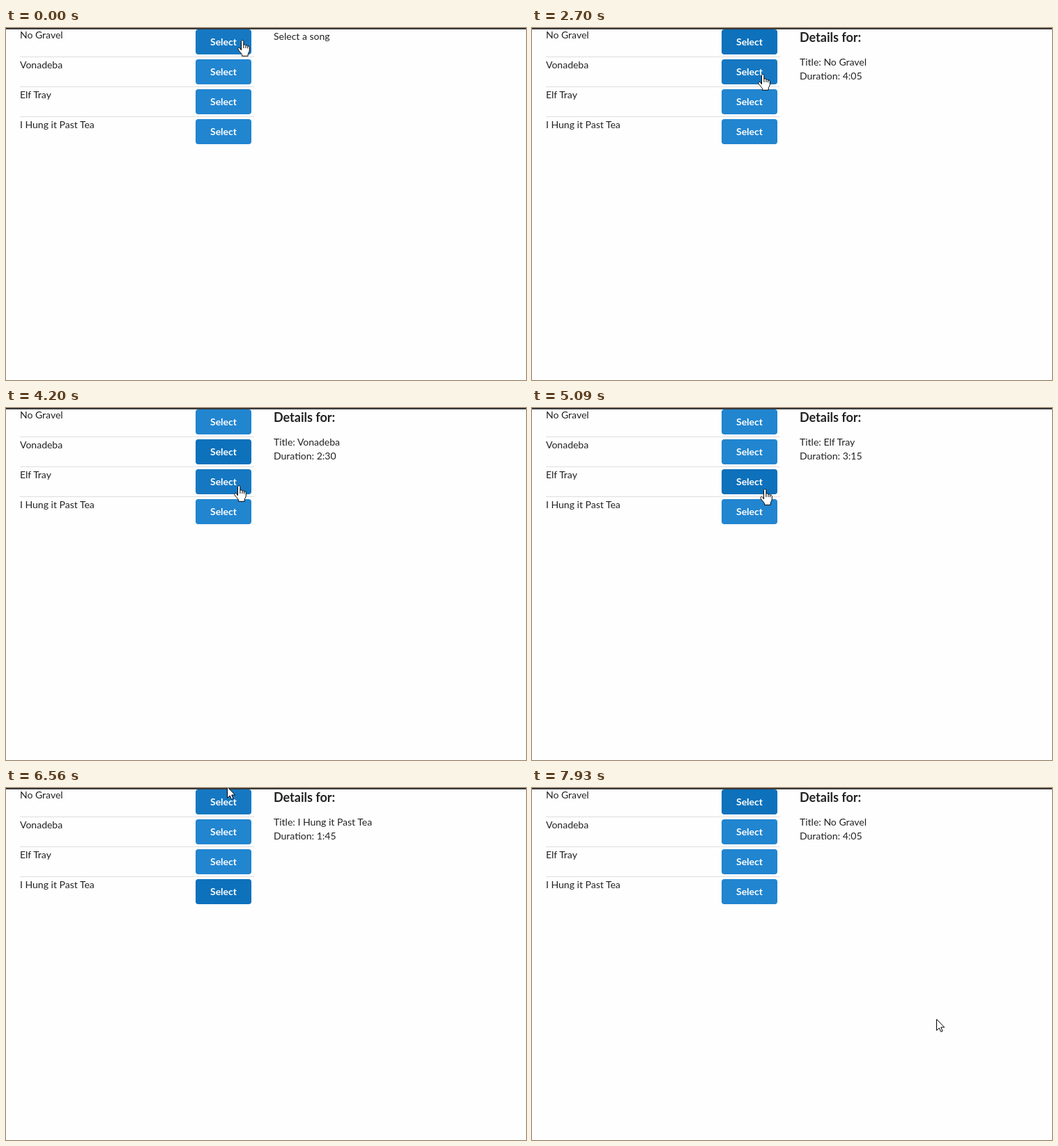
An HTML page that plays this animation: 746x506 px, repeating every 8000 ms.

```html
<!DOCTYPE html>
<html lang="en">
<head>
<meta charset="utf-8">
<title>Song list</title>
<style>
  :root {
    --base: #2185d0;
    --hover: #1678c2;
    --down: #1a69a4;
    --focus: #0d71bb;
    --fade: #1e80cb;
  }
  html, body { margin: 0; width: 100%; height: 100%; overflow: hidden; }
  body {
    position: relative;
    background: #fefefe;
    color: rgba(0, 0, 0, .87);
    font: 14px/19px Lato, sans-serif;
    white-space: nowrap;
  }
  .bar { position: absolute; inset: 0 0 auto; height: 2px; background: #363636; }

  .row { position: absolute; left: 20px; width: 336px; height: 43px; }
  .row:nth-of-type(2) { top: 0; }
  .row:nth-of-type(3) { top: 43px; }
  .row:nth-of-type(4) { top: 86px; }
  .row:nth-of-type(5) { top: 129px; }
  .row:not(.last)::after {
    content: "";
    position: absolute;
    left: 0; top: 41px;
    width: 100%; height: 1px;
    background: #dededf;
  }
  .button {
    position: absolute;
    left: 252px; top: 2px;
    width: 80px; height: 36px;
    border-radius: 4px;
    background: var(--base);
    color: #fff;
    font-weight: 700;
    line-height: 35px;
    text-align: center;
  }

  .panel { position: absolute; left: 384px; top: 0; width: 340px; height: 90px; overflow: hidden; }
  .page { position: relative; height: 90px; }
  .page > * { position: absolute; left: 0; margin: 0; }
  .page h3 { top: 2px; font-size: 18px; line-height: 22px; }
  .hint { top: 2px; }
  .title { top: 39px; }
  .time { top: 59px; }

  .cursor { position: absolute; left: 0; top: 0; width: 18px; height: 24px; }
  .cursor svg { position: absolute; left: 0; top: 0; overflow: visible; }
  .cursor path { fill: #fff; stroke: #000; stroke-linejoin: round; }

  /* 1% of the loop is 80 ms */
  .button, .pages, .cursor, .cursor svg { animation: 8s step-end infinite; }
  .b1 { animation-name: b1; }
  .b2 { animation-name: b2; }
  .b3 { animation-name: b3; }
  .b4 { animation-name: b4; }
  .pages { animation-name: pages; }
  .cursor { animation-name: move; }
  .cursor .hand { animation-name: hand; }
  .cursor .arrow { animation-name: arrow; }

  @keyframes b1 {
    0%, 79% { background: var(--hover); }
    19.625%, 90% { background: var(--down); }
    21.125%, 91.5%, 100% { background: var(--focus); }
    41.5% { background: var(--fade); }
    43.25% { background: var(--base); }
  }
  @keyframes b2 {
    0%, 58.625%, 100% { background: var(--base); }
    27.625% { background: var(--hover); }
    41.5% { background: var(--down); }
    43.25% { background: var(--focus); }
    57.125% { background: var(--fade); }
  }
  @keyframes b3 {
    0%, 72.875%, 100% { background: var(--base); }
    49.5% { background: var(--hover); }
    57.125% { background: var(--down); }
    58.625% { background: var(--focus); }
    71.375% { background: var(--fade); }
  }
  @keyframes b4 {
    0%, 91.5%, 100% { background: var(--base); }
    66.625% { background: var(--hover); }
    71.375% { background: var(--down); }
    72.875% { background: var(--focus); }
    90% { background: var(--fade); }
  }
  @keyframes pages {
    0% { transform: none; }
    21.125%, 91.5%, 100% { transform: translateY(-90px); }
    43.25% { transform: translateY(-180px); }
    58.625% { transform: translateY(-270px); }
    72.875% { transform: translateY(-360px); }
  }
  @keyframes move {
    0% { transform: translate(332px, 17px); }
    3.125% { transform: translate(318px, 17px); }
    4.625% { transform: translate(310px, 17px); }
    17.75% { transform: translate(310px, 16px); }
    24.625% { transform: translate(312px, 24px); }
    26.125% { transform: translate(318px, 42px); }
    27.625% { transform: translate(322px, 60px); }
    29.125% { transform: translate(324px, 70px); }
    33.75% { transform: translate(324px, 66px); }
    41.5% { transform: translate(324px, 65px); }
    46.5% { transform: translate(324px, 67px); }
    48% { transform: translate(324px, 75px); }
    49.5% { transform: translate(325px, 89px); }
    51% { transform: translate(326px, 103px); }
    52.5% { transform: translate(327px, 111px); }
    63.625% { transform: translate(327px, 116px); }
    65.125% { transform: translate(328px, 128px); }
    66.625% { transform: translate(329px, 140px); }
    68.125% { transform: translate(329px, 144px); }
    77.5% { transform: translate(321px, 83px); }
    79% { transform: translate(310px, 15px); }
    82% { transform: translate(317px, -2px); }
    83.5% { transform: translate(309px, 10px); }
    85% { transform: translate(309px, 14px); }
    96.125% { transform: translate(400px, 120px); }
    97.625% { transform: translate(540px, 286px); }
    99.125%, 100% { transform: translate(580px, 332px); }
  }
  @keyframes hand {
    0%, 83.5% { visibility: visible; }
    82%, 96.125%, 100% { visibility: hidden; }
  }
  @keyframes arrow {
    0%, 83.5% { visibility: hidden; }
    82%, 96.125%, 100% { visibility: visible; }
  }
</style>
</head>
<body>
  <div class="bar"></div>

  <div class="row">No Gravel<div class="button b1">Select</div></div>
  <div class="row">Vonadeba<div class="button b2">Select</div></div>
  <div class="row">Elf Tray<div class="button b3">Select</div></div>
  <div class="row last">I Hung it Past Tea<div class="button b4">Select</div></div>

  <section class="panel">
    <div class="pages">
      <div class="page"><p class="hint">Select a song</p></div>
      <div class="page">
        <h3>Details for:</h3>
        <p class="title">Title: No Gravel</p>
        <p class="time">Duration: 4:05</p>
      </div>
      <div class="page">
        <h3>Details for:</h3>
        <p class="title">Title: Vonadeba</p>
        <p class="time">Duration: 2:30</p>
      </div>
      <div class="page">
        <h3>Details for:</h3>
        <p class="title">Title: Elf Tray</p>
        <p class="time">Duration: 3:15</p>
      </div>
      <div class="page">
        <h3>Details for:</h3>
        <p class="title">Title: I Hung it Past Tea</p>
        <p class="time">Duration: 1:45</p>
      </div>
    </div>
  </section>

  <div class="cursor">
    <svg class="hand" width="18" height="24">
      <path d="M5.5 14.8V2.4C5.5 .1 8.9 .1 8.9 2.4V7.6C9.2 6.4 12 6.6 12 8.4C12.4 7.4 14.7 7.8 14.7 9.4C15.4 8.6 17.3 9 17.3 10.8V15C17.3 18 15.2 18.6 15.2 21V23.3H6.6V21.4C5.6 19 1.6 15.6 .9 13.4C.4 11.6 2.4 10.8 3.6 12Z"/>
      <path d="M8.9 7.6V12M12 8.4V12M14.7 9.4V12.4"/>
    </svg>
    <svg class="arrow" width="12" height="19">
      <path d="M.5 .5V16.5L4.2 13L6.6 18.4L9 17.4L6.7 12H11.6Z"/>
    </svg>
  </div>
</body>
</html>
```
